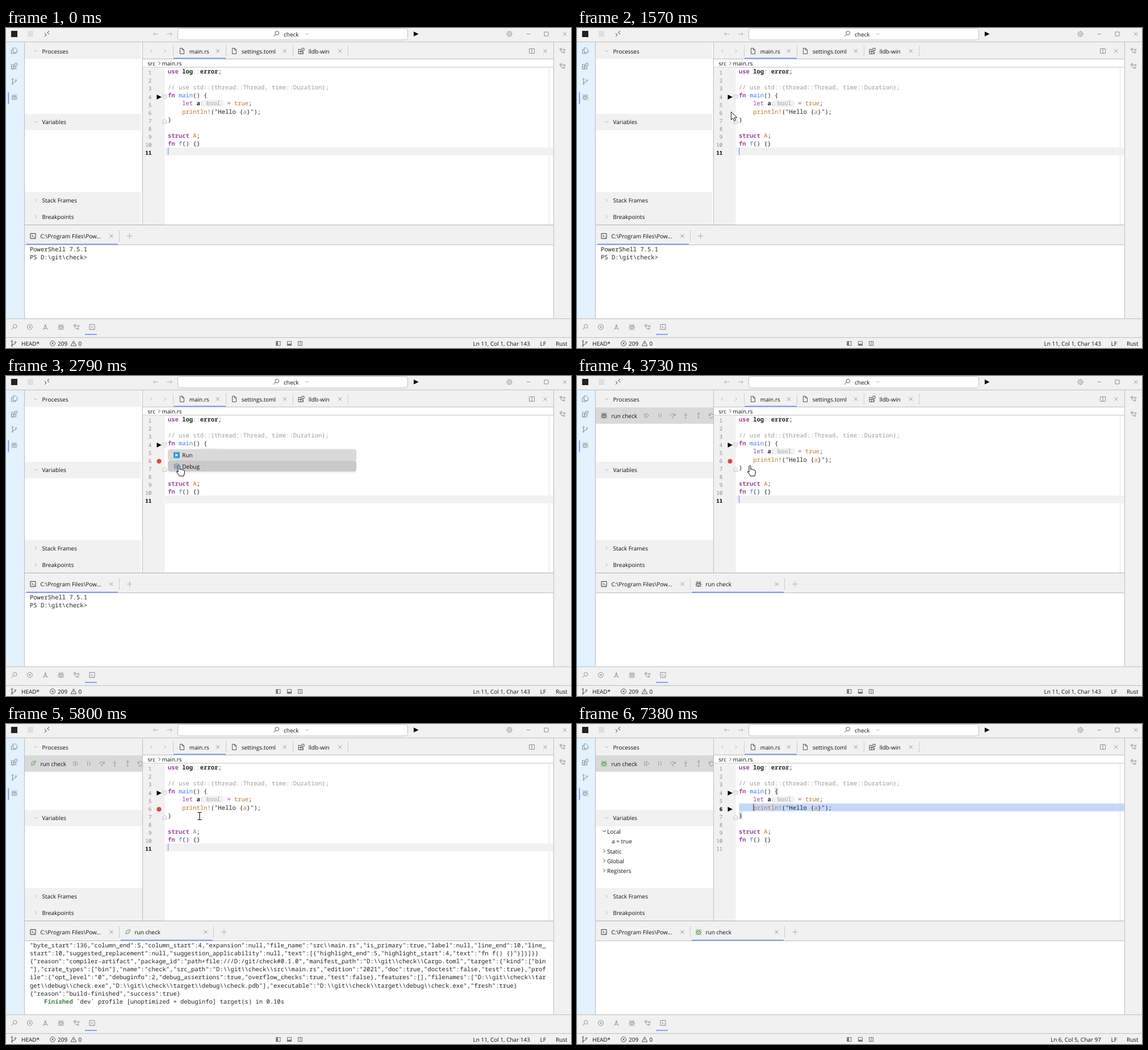
Write an HTML page that moves like this. It is 995 by 563 pixels and loops after 8.18 s.

```html
<!DOCTYPE html>
<html lang="en">
<head>
<meta charset="utf-8">
<title>Debugging in an editor</title>
<style>
html, body { margin: 0; width: 100%; height: 100%; overflow: hidden; background: #fff; }
svg { display: block; }
text { font: 10px "Open Sans", "Noto Sans", sans-serif; fill: #111; white-space: pre; text-rendering: geometricPrecision; }
.m { font: 500 10.52px "Noto Sans Mono", "DejaVu Sans Mono", monospace; fill: #222; font-variant-ligatures: none; }
.n { font-size: 9.4px; fill: #888; text-anchor: end; }
.n.on { fill: #000; font-weight: 700; }
.h { font-size: 10.2px; fill: #a5a5a5; }
.e { text-anchor: end; }
.k { fill: #9b45a0; }
.f { fill: #4078f2; }
.o { fill: #b9772c; }
.c { fill: #9c9c9c; }
.b { font-weight: 700; }
.g { fill: #3f7f45; font-weight: 600; }
</style>
</head>
<body>
<svg id="stage" width="995" height="563" viewBox="0 0 995 563"></svg>
<script>
const LOOP = 8180, OPEN = 2290, LAUNCH = 3480, OUTPUT = 3790, ATTACH = 5800, READY = 6230, BREAK = 6510;
const GRAY = '#858585', PALE = '#aaa', DARK = '#222', GREEN = '#2c982c', BLUE = '#6f94f8', PANEL = '#f1f1f1', EDGE = '#bdbdbd';

const circle = (x, y, r) => `M${x - r} ${y}a${r} ${r} 0 1 0 ${2 * r} 0a${r} ${r} 0 1 0 ${-2 * r} 0`;
const icons = {
  search: circle(1.2, -1.2, 3.3) + 'M-1.2 1.2L-5 5',
  menu: 'M-5-3.5h10M-5 0h10M-5 3.5h10',
  remote: 'M-4-1l3 3l-3 3M4-5l-3 3l3 3M4-5',
  left: 'M4.5 0h-9l3-3M-4.5 0l3 3',
  right: 'M-4.5 0h9l-3-3M4.5 0l-3 3',
  down: 'M-3-1.5l3 3l3-3',
  next: 'M-1.5-3l3 3l-3 3',
  prev: 'M1.5-3l-3 3l3 3',
  close: 'M-3-3l6 6M3-3l-6 6',
  plus: 'M-5 0h10M0-5v10',
  minus: 'M-3 0h6',
  box: 'M-3.5-3.5h7v7h-7z',
  gear: circle(0, 0, 1.5) + circle(0, 0, 4) + 'M0-4v-1.5M0 4v1.5M-4 0h-1.5M4 0h1.5M-3-3l-1-1M3 3l1 1M3-3l1-1M-3 3l-1 1',
  files: 'M-2-5h4l3 3v5h-7zM-2-2h-3v7h7v-2',
  file: 'M-3.5-5h4l3 3v7h-7zM.5-5v3h3',
  blocks: 'M-5-3h4v8h-4zM-5 1h8v4h-8M3 5v-4M1-5h4v4h-4z',
  git: circle(-3, -4, 1.2) + circle(-3, 4, 1.2) + circle(3, -2, 1.2) + 'M-3-2.8v5.6M3-.8q0 2.5-6 2.5',
  bug: 'M-3-1v2a3 3.7 0 0 0 6 0v-2zM-2-1a2 2.5 0 0 1 4 0M-3 1h-2.5M3 1h2.5M-3-1l-2-2M3-1l2-2M-3 3l-2 2M3 3l2 2M-2-3l-1.5-2M2-3l1.5-2M0 0v4',
  tree: circle(-3.5, -2.5, 1.3) + circle(3.5, -1.5, 1.3) + circle(2.5, 3, 1.3) + 'M-2-2.5l4 .7M-3-1.5q0 4.5 4 4.5M-1-5l-2 1',
  error: circle(0, 0, 4.5) + 'M-1.8-1.8l3.6 3.6M1.8-1.8l-3.6 3.6',
  compass: 'M0-5v2M0-2l-4 7M0-2l4 7M-2.8 2q2.8 1.5 5.6 0' + circle(0, -2, 1),
  shell: 'M-4.5-4.5h9v9h-9zM-2-2l2 2l-2 2M1 2h2',
  warn: 'M0-4.5l4.8 8.5h-9.6zM0-1.5v3',
  split: 'M-4.5-4h9v8h-9zM0-4v8',
  plug: 'M-4 4l2-2q-2.5-4 3-5.5l2.5-1q1.5 0 1 1.5l-1 2.5q-1.5 5.5-5.5 2.5M0 1l2-2',
  resume: 'M-4-4v8M-1-4l5 4l-5 4z',
  pause: 'M-2-4v8M2-4v8',
  over: 'M-4.5 1a4.5 4.5 0 0 1 8.5-1.5M4.5-4v4h-4' + circle(0, 3, 1),
  into: 'M0-5v6M-2.5-1.5l2.5 2.5l2.5-2.5' + circle(0, 4, 1),
  out: 'M0 2v-7M-2.5-2.5l2.5-2.5l2.5 2.5' + circle(0, 4, 1),
  again: 'M-4-3v3h3M-4 0a4 4 0 1 1 1 3'
};

const rect = (x, y, w, h, fill, more = '') => `<rect x="${x}" y="${y}" width="${w}" height="${h}" fill="${fill}" ${more}/>`;
const label = (x, y, s, cls = '') => `<text x="${x}" y="${y + 3.7}" class="${cls}">${s}</text>`;
const icon = (name, x, y, color = GRAY, width = .9) =>
  `<path d="${icons[name]}" transform="translate(${x} ${y})" fill="none" stroke="${color}" stroke-width="${width}"/>`;
const play = (x, y) => `<path d="M${x} ${y - 4.2}l8.5 4.2l-8.5 4.2z" fill="#000"/>`;
const row = (names, x, y, step, color) => names.map((n, i) => icon(n, x + i * step, y, color)).join('');
const during = (a, b, ...parts) => `<g data-a="${a}" data-b="${b}">${parts.join('')}</g>`;
const span = (cls, s) => `<tspan class="${cls}">${s}</tspan>`;
const lineY = n => 76.3 + 14.1 * (n - 1);
const code = (n, s, x = 285) => label(x, lineY(n), s, 'm');
const number = (n, on = '') => label(256.5, lineY(n) + 2.2, n, 'm n ' + on);
const terminal = lines => lines.map((s, i) => label(42, 389.3 + 14.1 * i, s, 'm')).join('');

const sep = span('c', '::');
const log = [
  String.raw`"byte_start":136,"column_end":5,"column_start":4,"expansion":null,"file_name":"src\\main.rs","is_primary":true,"label":null,"line_end":10,"line_`,
  String.raw`start":10,"suggested_replacement":null,"suggestion_applicability":null,"text":[{"highlight_end":5,"highlight_start":4,"text":"fn f() {}"}]}]}}`,
  String.raw`{"reason":"compiler-artifact","package_id":"path+file:///D:/git/check#0.1.0","manifest_path":"D:\\git\\check\\Cargo.toml","target":{"kind":["bin`,
  String.raw`"],"crate_types":["bin"],"name":"check","src_path":"D:\\git\\check\\src\\main.rs","edition":"2021","doc":true,"doctest":false,"test":true},"prof`,
  String.raw`ile":{"opt_level":"0","debuginfo":2,"debug_assertions":true,"overflow_checks":true,"test":false},"features":[],"filenames":["D:\\git\\check\\tar`,
  String.raw`get\\debug\\check.exe","D:\\git\\check\\target\\debug\\check.pdb"],"executable":"D:\\git\\check\\target\\debug\\check.exe","fresh":true}`,
  '{"reason":"build-finished","success":true}',
  '    ' + span('g', 'Finished') + ' `dev` profile [unoptimized + debuginfo] target(s) in 0.10s'
];

const titleBar = [
  rect(0, 0, 995, 563, PANEL), rect(0, 24, 995, 1, EDGE),
  rect(9, 5, 11, 11, DARK),
  icon('menu', 43, 10.5, PALE), icon('remote', 72, 10, DARK),
  icon('left', 264, 10.5, PALE), icon('right', 288, 10.5, PALE),
  rect(302.5, .5, 405, 20.5, '#fff', `rx="4.5" stroke="${EDGE}"`),
  icon('search', 476, 10, '#444'), label(489, 11, 'check'), icon('down', 530, 10.5, PALE),
  play(718, 10.5), icon('gear', 886.5, 10.5),
  icon('minus', 920, 10.5), icon('box', 951.5, 10.5), icon('close', 984, 10.5)
];

const sidebars = [
  rect(0, 25, 32, 486, '#e2f2fe'), rect(32, 25, 1, 486, EDGE),
  row(['files'], 14.5, 40, 0, GRAY), icon('blocks', 14.5, 67), icon('git', 14.5, 94), icon('bug', 14.5, 121.5),
  rect(3.5, 113, 1.7, 21, BLUE),
  rect(964, 25, 1, 486, EDGE), icon('tree', 980, 40), icon('tree', 980, 67),
  rect(33, 54.5, 207, 96.5, '#fff'), rect(33, 180, 207, 108.5, '#fff'),
  during(0, LAUNCH, rect(237.5, 26, 2.5, 320, '#fbfbfb')),
  rect(240, 25, 1, 321, EDGE),
  ...[['Processes', 41, 'down'], ['Variables', 165.5, 'down'], ['Stack Frames', 303.5, 'next'], ['Breakpoints', 332.5, 'next']]
    .map(([s, y, i]) => icon(i, 52, y - .5, PALE) + label(63.5, y, s)),
  during(LAUNCH, LOOP,
    rect(33, 55, 207, 29, '#d9d9d9'), label(60.5, 70, 'run check'),
    row(['resume', 'pause', 'over', 'into', 'out'], 123, 69.5, 22.8, '#8f8f96'),
    `<svg width="240" height="90">${icon('again', 236.5, 69.5)}</svg>`),
  during(BREAK, LOOP,
    icon('down', 48, 188.5, DARK), label(53, 189, 'Local'), label(61, 206.5, 'a = true'),
    ...['Static', 'Global', 'Registers'].map((s, i) =>
      icon('next', 48, 223.5 + 17.1 * i, DARK) + label(53, 224 + 17.1 * i, s)))
];

const tabs = [
  rect(241, 54, 723, 1, EDGE),
  icon('prev', 256, 40.5, PALE), icon('next', 280, 40.5, PALE),
  ...[['file', 310, 'main.rs', 373], ['file', 402, 'settings.toml', 491], ['blocks', 520, 'lldb-win', 588]]
    .map(([i, x, s, end]) => icon(i, x, 40.5, '#444') + label(x + 12.7, 41, s) + icon('close', end, 40.5, GRAY)
      + rect(end + 14, 31, 1, 19, '#ccc')),
  rect(294, 31, 1, 19, '#ccc'), rect(295, 52.5, 92, 1.7, BLUE),
  icon('split', 926, 40.5), icon('close', 949.5, 40.5),
  rect(241, 55, 723, 291, '#fff'), label(249.5, 62.5, 'src'), icon('next', 270, 62, '#444'), label(274.5, 62.5, 'main.rs'),
  rect(241, 68.5, 723, 1, EDGE), rect(241, 69.5, 38.5, 276.5, PANEL), rect(956, 69.5, 1, 276.5, '#e2e2e2')
];

const editor = [
  during(0, BREAK, rect(280, 210.3, 684, 13.8, '#f1f1f1'), number(6), number(11, 'on')),
  during(BREAK, LOOP, rect(285.5, 139.8, 678.5, 13.7, '#c5d8fc'),
    rect(348.5, 112, 6, 13, '#d8ead8'), rect(285.5, 154, 6, 13, '#d8ead8'), number(6, 'on'), number(11)),
  ...[1, 2, 3, 4, 5, 7, 8, 9, 10].map(n => number(n)),
  play(265.5, 121.5),
  `<path d="M276 118h7v4l-3.5 3l-3.5-3zM278 121h3M276 168h7v-4.500l-3.5-3l-3.5 3zM278 165h3" fill="#fff" stroke="${PALE}" stroke-width=".8"/>`,
  code(1, span('k b', 'use') + span('b', ' log') + sep + span('b', 'error') + ';'),
  code(3, span('c', '// use std::{thread::Thread, time::Duration};')),
  code(4, span('k b', 'fn') + ' ' + span('f', 'main') + '() {'),
  code(5, '    ' + span('k', 'let') + ' ' + span('b', 'a')),
  rect(342.5, 127, 40.5, 11.5, '#f1f1f1', 'rx="2"'), label(341.5, lineY(5), ':', 'm h'), label(353, lineY(5), 'bool', 'm h'),
  code(5, span('k', '=') + ' ' + span('o', 'true') + ';', 389.2),
  code(6, '    ' + span('o', 'println!') + '("Hello {' + span('o', 'a') + '}");'),
  code(7, '}'),
  code(9, span('k b', 'struct') + ' ' + span('o', 'A') + ';'),
  code(10, span('k b', 'fn') + ' ' + span('f', 'f') + '() {}'),
  during(0, OPEN, rect(285, 210.5, 1.2, 13, BLUE)),
  during(LAUNCH, BREAK, rect(285, 210.5, 1.2, 13, BLUE)),
  during(BREAK, LOOP, rect(310.3, 140.5, 1.2, 12.5, '#444'), play(265.5, 150)),
  during(1700, BREAK, `<circle cx="269.5" cy="150" r="4" fill="#df4545"/>`),
  during(OPEN, LAUNCH,
    rect(284.5, 127.5, 333, 44, '#000', 'rx="5" opacity=".035"'),
    rect(285, 128, 332, 42.5, '#f2f2f2', 'rx="4.5"'), rect(285, 129, 332, 19.7, '#d9d9d9', 'rx="4.5"'),
    during(2690, LAUNCH, rect(285, 148.7, 332, 19.3, '#c9c9c9', 'rx="4.5"')),
    rect(295, 134, 11, 10.5, '#2f9bd8', 'rx="1"'), '<path d="M298.500 136.500l5 2.700l-5 2.700z" fill="#fff"/>',
    label(310.3, 139.3, 'Run'), icon('gear', 300.5, 159, '#6c94b8', 1.5), label(310.3, 159.3, 'Debug'))
];

const bugPair = (name, color) => icon(name, 47.5, 69.5, color) + icon(name, 214, 366, color);
const bottom = [
  rect(33, 346, 932, 1, '#b0b0b0'), rect(33, 381, 931, 1, EDGE), rect(33, 382, 931, 129, '#fff'),
  rect(0, 511, 995, 1, EDGE), rect(0, 544, 995, 1, EDGE),
  icon('shell', 47.5, 366, DARK), label(60.5, 366.5, 'C:\\Program Files\\Pow...'), icon('close', 185.5, 366), rect(199, 356, 1, 20, '#ccc'),
  during(0, LAUNCH, rect(36, 379.6, 161, 1.7, BLUE), icon('plus', 217.5, 366, PALE),
    terminal(['PowerShell 7.5.1', 'PS D:\\git\\check>'])),
  during(LAUNCH, LOOP, rect(202, 379.6, 162, 1.7, BLUE), label(226.5, 366.5, 'run check'),
    icon('close', 351.5, 366), rect(365, 356, 1, 20, '#ccc'), icon('plus', 384, 366, PALE)),
  during(LAUNCH, ATTACH, bugPair('bug', '#333')),
  during(ATTACH, READY, bugPair('plug', GREEN)),
  during(READY, LOOP, bugPair('bug', GREEN)),
  during(OUTPUT, READY, terminal(log)),
  row(['search', 'error', 'compass', 'bug', 'tree', 'shell'], 14.5, 526, 27.4, GRAY), rect(139, 538.3, 21, 1.7, BLUE),
  icon('git', 13.5, 555, '#444'), label(27, 555.7, 'HEAD*'),
  icon('error', 82, 555, '#444'), label(91, 555.7, '209'), icon('warn', 119, 555, '#444'), label(127.5, 555.7, '0'),
  ...[479.5, 499, 518].map(x => icon('box', x, 555, '#777', 1.1)),
  rect(475.5, 551, 3.5, 8, '#777'), rect(495, 555.5, 8, 3.5, '#777'), rect(517.5, 551, 1, 8, '#777'),
  during(0, BREAK, label(923, 555.7, 'Ln 11, Col 1, Char 143', 'e')),
  during(BREAK, LOOP, label(923, 555.7, 'Ln 6, Col 5, Char 97', 'e')),
  label(940.5, 555.7, 'LF'), label(968, 555.7, 'Rust')
];

const pointers = {
  arrow: '<path d="M0 0v14l3.300-3l2.200 5l2.400-1l-2.200-4.800h4.500z" fill="#fff" stroke="#000" stroke-width=".9"/>',
  hand: '<path d="M-1.500 1.500q1.500-2.500 3 0v6l1.500-.7l2 1l2 .2l2.500 1.500q.8 1.500.3 4.500l-1.500 5h-7.300q-2.500-4-5-7q-.3-1.800 1.500-1.300l1 1.200z" fill="#fff" stroke="#000"/>',
  beam: '<path d="M-3.500-6.500h2.500l1 .8l1-.8h2.500M0-6v12M-3.500 6.500h2.500l1-.8l1 .8h2.500" fill="none" stroke="#000" stroke-width="1.1"/>'
};

const stage = document.getElementById('stage');
stage.innerHTML = [...titleBar, ...sidebars, ...tabs, ...editor, ...bottom].join('') +
  `<g id="pointer">${Object.keys(pointers).map(k => `<g id="${k}">${pointers[k]}</g>`).join('')}</g>`;

const timed = [...stage.querySelectorAll('[data-a]')];
const pointer = document.getElementById('pointer');
const shapes = Object.keys(pointers).map(k => document.getElementById(k));

// Pointer path: time, x, y
const path = [
  [210, 581, 497], [500, 484, 336], [1020, 282, 152], [1250, 276, 150], [1570, 271.5, 147.5], [1870, 268, 146],
  [1940, 268, 146], [2200, 270, 123.5], [2530, 270, 123.5], [2790, 304.5, 157], [3740, 304.5, 157],
  [3990, 341, 162], [7020, 341, 162], [7380, 522, 478]
];

function pointerAt(t) {
  const i = path.findIndex(p => p[0] > t);
  const [t0, x0, y0] = path[i - 1], [t1, x1, y1] = path[i];
  const u = (t - t0) / (t1 - t0), e = u * u * (3 - 2 * u);
  return [x0 + (x1 - x0) * e, y0 + (y1 - y0) * e];
}

const show = (el, on) => el.setAttribute('display', on ? 'inline' : 'none');

function draw(now) {
  const t = now % LOOP;
  for (const el of timed) show(el, t >= +el.dataset.a && t < +el.dataset.b);
  const visible = t >= 210 && t < 7380;
  show(pointer, visible);
  if (visible) {
    const [x, y] = pointerAt(t);
    const kind = t > 1960 && t < 3780 ? 'hand' : y > 346 || x < 285 ? 'arrow' : 'beam';
    pointer.setAttribute('transform', `translate(${x} ${y})`);
    shapes.forEach(s => show(s, s.id === kind));
  }
  requestAnimationFrame(draw);
}

const start = performance.now();
requestAnimationFrame(now => draw(Math.max(0, now - start)));
</script>
</body>
</html>
```
